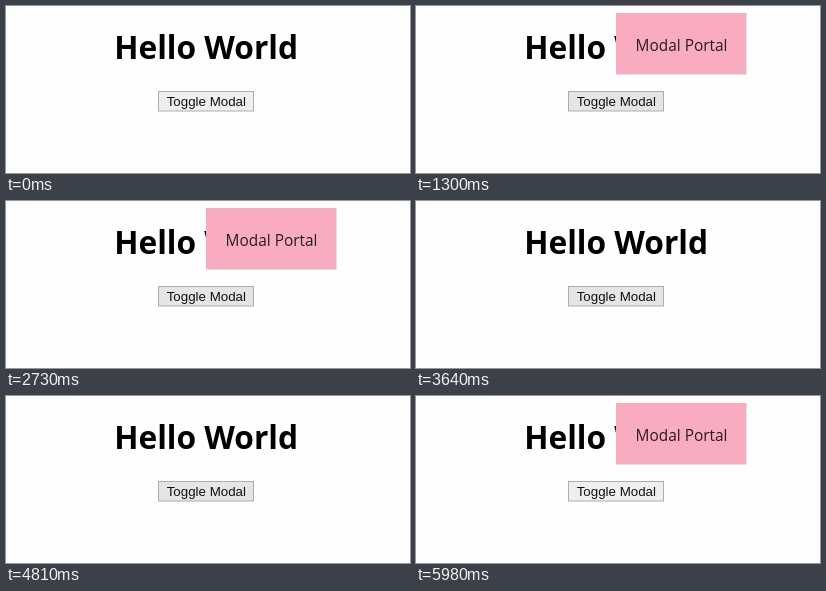
Animation, 404 px wide and 167 px high, one loop 6.89 s. Source, as an HTML page:

```html
<!DOCTYPE html>
<html lang="en">
<head>
<meta charset="utf-8">
<title>Modal toggle</title>
<style>
  html, body { margin: 0; width: 100%; height: 100%; overflow: hidden; background: #fefefe; }
  svg { display: block; width: 100%; height: 100%; }
  .title { font: bold 31.7px "Open Sans", "Noto Sans", sans-serif; fill: #000; }
  .label { font: 13.333px "Liberation Sans", Arial, sans-serif; fill: #111; text-anchor: middle; }
  .note { font: 15.4px "Open Sans", "Noto Sans", sans-serif; fill: #2a1c21; }
</style>
</head>
<body>
<svg viewBox="0 0 404 167">
  <rect width="404" height="167" fill="#fefefe"/>
  <text class="title" x="108.2" y="53">Hello World</text>
  <rect id="button" x="152.5" y="85.5" width="95" height="19.5" stroke="#adadad"/>
  <text class="label" x="200.3" y="100">Toggle Modal</text>
  <g id="modal">
    <rect x="200.5" y="7.5" width="129.5" height="60.5" fill="#f9abc0" stroke="#e3b3bf"/>
    <text class="note" x="219.6" y="44.5">Modal Portal</text>
  </g>
</svg>
<script>
  const LOOP = 6890;
  const IDLE = '#efefef', HOVER = '#e5e5e5', PRESSED = '#f3f3f3';

  // Each entry holds from its start time until the next one.
  const toggles = [[0, false], [1170, true], [2210, false], [2730, true],
                   [3640, false], [4160, true], [4810, false], [5460, true]];
  const fills = [[0, IDLE], [1040, HOVER], [2470, PRESSED], [2730, HOVER],
                 [5200, PRESSED], [5460, HOVER], [5980, IDLE]];

  const button = document.getElementById('button');
  const modal = document.getElementById('modal');

  const valueAt = (steps, t) => steps.filter(([start]) => start <= t).pop()[1];

  function render(t) {
    button.setAttribute('fill', valueAt(fills, t));
    modal.setAttribute('visibility', valueAt(toggles, t) ? 'visible' : 'hidden');
  }

  const began = performance.now();
  function tick() {
    render((performance.now() - began) % LOOP);
    requestAnimationFrame(tick);
  }
  tick();
</script>
</body>
</html>
```
